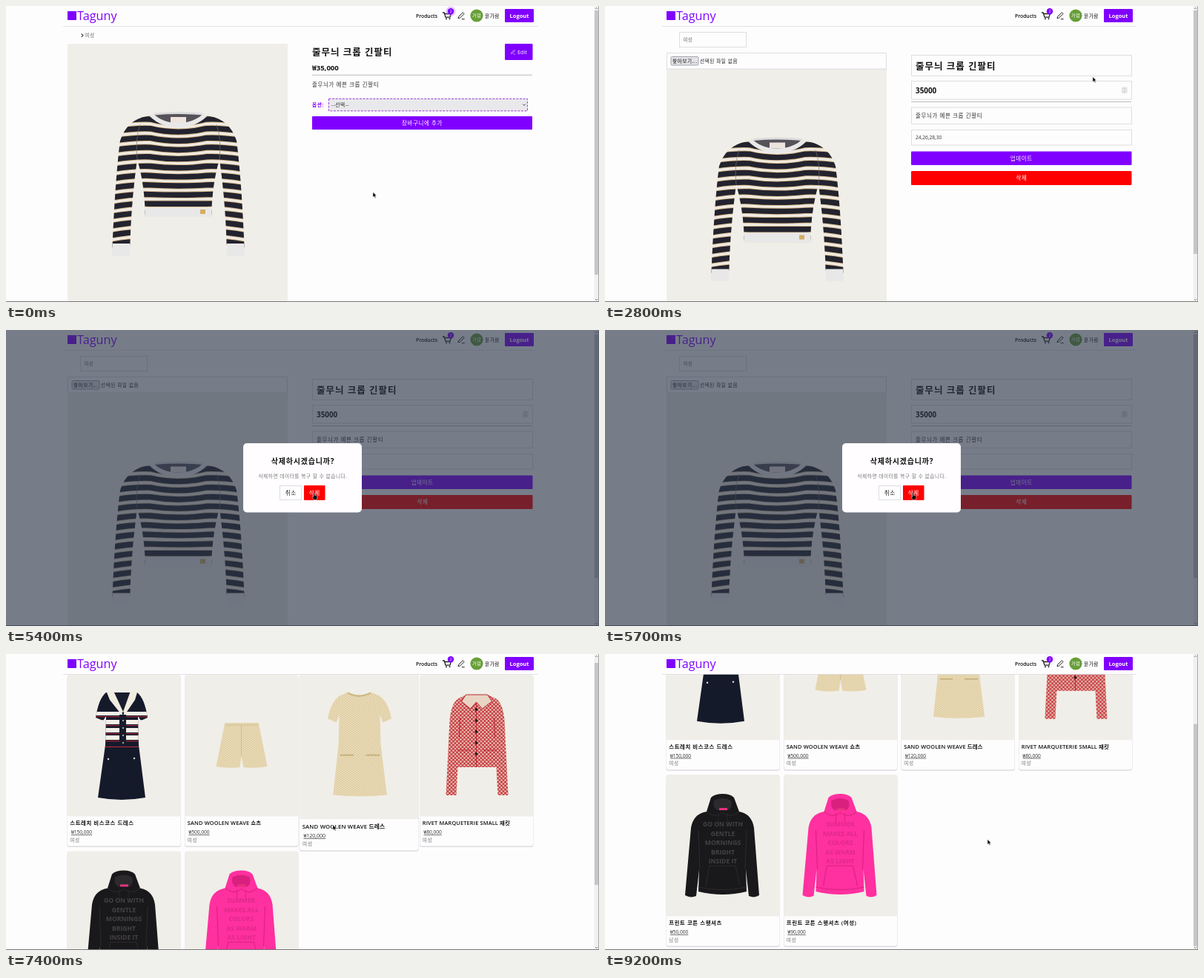
Animation, 800 px wide and 400 px high, one loop 9.3 s. Source, as an HTML page:

```html
<!DOCTYPE html>
<html lang="ko">
<head>
<meta charset="utf-8">
<title>Shop demo</title>
<style>
html, body { margin: 0; width: 100%; height: 100%; overflow: hidden; background: #fefdfe; }
svg { display: block; width: 800px; height: 400px; }
text { font-family: "Open Sans", "Noto Sans CJK KR", "Noto Sans CJK", sans-serif; white-space: pre; }
</style>
</head>
<body>
<svg id="stage" viewBox="0 0 800 400" xmlns="http://www.w3.org/2000/svg"></svg>
<script>
const PURPLE = '#8000ff', RED = '#ff0000', INK = '#111', BEIGE = '#f0eee8', LINE = '#dedde0';
const LOOP = 9300;

// Drawing helpers
const rect = (x, y, w, h, fill, more = '') =>
  `<rect x="${x}" y="${y}" width="${w}" height="${h}" fill="${fill}" ${more}/>`;
const path = (d, fill, more = '') => `<path d="${d}" fill="${fill}" ${more}/>`;
const stroke = (d, color, width = 1, more = '') =>
  path(d, 'none', `stroke="${color}" stroke-width="${width}" ${more}`);
const circle = (x, y, r, fill, more = '') => `<circle cx="${x}" cy="${y}" r="${r}" fill="${fill}" ${more}/>`;
const group = (id, body, more = '') => `<g id="${id}" ${more}>${body}</g>`;

function text(x, y, str, size, { fill = INK, weight = 400, anchor = 'start', more = '' } = {}) {
  const hangul = /[가-힣]/.test(str), latin = /[A-Z]/.test(str);
  const spacing = hangul ? (latin ? 0.02 : 0.08) : 0;
  return `<text x="${x}" y="${y}" font-size="${size}" fill="${fill}" font-weight="${weight}" ` +
    `text-anchor="${anchor}" letter-spacing="${(spacing * size).toFixed(2)}" ${more}>${str}</text>`;
}
const field = (x, y, w, h) => rect(x + .5, y + .5, w - 1, h - 1, '#fefdfe', `stroke="${LINE}"`);
const button = (x, y, w, h, fill, label, size = 7.5, weight = 400) =>
  rect(x, y, w, h, fill, 'rx="1"') +
  text(x + w / 2, y + h / 2 + size * .37, label, size, { fill: '#fff', weight, anchor: 'middle' });
const pencil = (x, y, s, color) =>
  `<g transform="translate(${x} ${y}) scale(${s})">` +
  stroke('M1 9L1.8 6.4L7.6 .8L9.4 2.6L3.7 8.2ZM6 10H10', color, 1) + '</g>';

// Garments
function sweater() {
  const body = 'M190 149Q163 154 154 182Q147 235 143 338H167Q168 270 177 207Q187 240 188 285H277' +
    'Q278 240 288 207Q297 270 298 338H322Q318 235 311 182Q302 154 275 149Q265 144 262 144H203Q200 144 190 149Z';
  let stripes = '';
  for (let i = 0; i < 14; i++) {
    const y = 153 + i * 12.7, sag = Math.max(0, 10 - i * 1.1);
    const d = `M138 ${y + 5}Q170 ${y - 1} 195 ${y}Q232 ${y + sag} 270 ${y}Q295 ${y - 1} 327 ${y + 5}`;
    stripes += stroke(d, '#d9bd8d', 9.4) + stroke(d, '#23232f', 7.4);
  }
  return `<clipPath id="knit"><path d="${body}"/></clipPath><g clip-path="url(#knit)">` +
    rect(140, 140, 190, 200, '#efebe5') + stripes +
    rect(186, 272, 93, 14, '#e9e8e8') + rect(140, 321, 30, 20, '#e9e8e8') + rect(296, 321, 30, 20, '#e9e8e8') +
    stroke('M177 207Q174 180 181 160M288 207Q291 180 284 160', '#77727a', .6) + '</g>' +
    path('M200 147Q232 142 265 147Q252 160 232 160Q212 160 200 147Z', '#55525a') +
    rect(222, 150, 21, 8, '#eee3dd') +
    stroke('M196 147Q210 161 232 161Q255 161 269 147', '#e9e8e8', 6) +
    stroke('M200 146Q232 143 265 146', '#dddcdc', 3) +
    rect(262, 275, 7, 6, '#d3ae62');
}

function stripedDress() {
  const shape = 'M52 24Q42 32 38 58L48 62L52 56L51 95L41 166Q73 172 105 166L96 95L95 56L99 62L108 58Q104 32 94 24Z';
  const bands = [[50, 5], [61, 6], [72, 6], [82, 6]].map(([y, h]) =>
    rect(35, y, 76, h, '#f3efe8') + rect(35, y + h + 1.2, 76, 1, '#c22b38')).join('');
  const dots = [62, 72, 82, 92].map(y => circle(75, y, 1.1, '#d8c999')).join('');
  return `<clipPath id="navy"><path d="${shape}"/></clipPath>` + path(shape, '#151a2b') +
    `<g clip-path="url(#navy)">${bands}${rect(35, 97, 76, 1, '#c22b38')}</g>` +
    path('M63 24H84L75 56Z', '#181c2c') + rect(70, 54, 9, 41, '#181c2c') + dots +
    path('M53 24L62 22L75 50L72 53L57 34Z', '#f1ece0') + path('M94 24L85 22L75 50L78 53L91 34Z', '#f1ece0') +
    circle(55, 114, 1.2, '#e5e0d2') + circle(90, 113, 1.2, '#e5e0d2');
}

const tweedShape = (d, extra = '') => path(d, '#e3d2aa') + path(d, 'url(#tweed)') + extra;
const shorts = () => tweedShape('M54 65H99L103 84L111 124Q94 127 79 125L76 110L74 125Q58 127 42 124L50 84Z',
  stroke('M54 68H99M76 68V110', '#cdb987', .8));
const tweedDress = () => tweedShape(
  'M62 28Q76 35 91 28L101 32Q113 38 118 62L107 67L103 57L104 95L112 160Q77 164 43 160L50 95L51 57L47 67L36 62Q41 38 53 32Z',
  stroke('M62 29Q76 37 91 29', '#cdb987', 2) + stroke('M52 109H69M85 109H103', '#c3ac76', 1.6));

function jacket() {
  const d = 'M52 32Q42 38 40 62L35 163H49L53 85L50 125H104L101 85L105 163H119L114 62Q112 38 102 32L91 27H62Z';
  const studs = [47, 62, 77, 92, 107].map(y => circle(76, y, 2, '#2b2020')).join('');
  return path(d, '#ead7c2') + path(d, 'url(#weave)') +
    path('M62 27H91L97 36L84 46L76 37L68 46L56 36Z', '#e8d5c3', 'stroke="#bd2833" stroke-width="1"') +
    stroke('M76 38V125M50 102H68M85 102H104M53 85L54 58M101 85L100 58', '#bd2833', 1.1) + studs;
}

function hoodie(main, shade, ink, lines) {
  const print = lines.map((s, i) =>
    text(76, 70 + i * 12.5, s, 8.6, { fill: ink, weight: 700, anchor: 'middle' })).join('');
  return path('M54 50Q36 53 33 72L25 163Q32 167 40 164L44 128L43 158Q76 166 108 158L107 128L111 164' +
      'Q119 167 125 163L118 72Q115 53 98 50L91 31Q86 26 76 26Q65 26 60 31Z', main) +
    path('M64 35Q76 29 87 35Q90 44 84 48H68Q62 44 64 35Z', shade) + rect(71, 45, 11, 3, '#e8327f') +
    stroke('M54 50Q66 60 76 51Q86 60 98 50M45 128L43 75M106 128L108 75M53 150L58 123H93L99 150M43 152Q76 159 108 152', shade, 1) +
    stroke('M70 52V68M82 52V66', shade, .8) + print;
}

// Pages
const header = () =>
  rect(0, 0, 794, 27, '#fefdfe') + rect(77, 27, 640, .8, LINE) +
  rect(83, 7, 12, 12, PURPLE) + text(96, 19, 'Taguny', 16.2, { fill: PURPLE }) +
  text(553, 16, 'Products', 6.8, { weight: 600 }) +
  stroke('M589 9H591.2L593 15.2H599L600.4 10.5H592', '#222', 1.3) +
  circle(594, 17.3, 1, '#222') + circle(598.5, 17.3, 1, '#222') +
  circle(600, 7.3, 4.2, '#b05cff', 'id="ping"') + circle(600, 7.3, 4.2, PURPLE) +
  text(600, 9, '2', 4.8, { fill: '#fff', anchor: 'middle' }) +
  pencil(609, 8, .97, '#222') +
  circle(635, 13, 8.6, '#689f38') + text(635.2, 15.3, '가람', 6.2, { fill: '#fff', anchor: 'middle' }) +
  text(646, 15.8, '윤가람', 6.67, { weight: 500 }) +
  button(673, 4, 39, 18, PURPLE, 'Logout', 7.5, 700);

const detailPage = () =>
  stroke('M101.7 37.5L104 39.8L101.7 42', '#444', 1.1) + text(106.3, 42.3, '여성', 6.67, { fill: '#666' }) +
  rect(83, 51, 297, 349, BEIGE) + '<use href="#sweater"/>' +
  text(413, 67, '줄무늬 크롭 긴팔티', 12.5, { weight: 700 }) +
  text(413, 87, '₩35,000', 9.6, { weight: 700 }) + rect(413, 92.8, 297, .9, '#b5b5b8') +
  text(413, 108.5, '줄무늬가 예쁜 크롭 긴팔티', 7.5, { fill: '#333' }) +
  text(413, 136, '옵션:', 6.67, { fill: PURPLE, weight: 700 }) +
  rect(435.4, 125.4, 268, 16.4, '#e9e9ec', 'stroke="#8b2bd0" stroke-width=".9" stroke-dasharray="3 1.6"') +
  text(439, 136, '--선택--', 6.67, { fill: '#222' }) +
  stroke('M697.3 132.6L699 134.4L700.7 132.6', '#333', .9) +
  button(413, 149, 297, 18, PURPLE, '장바구니에 추가') +
  rect(673, 53, 37.5, 21.5, '#b9a7cc', 'rx="2" id="editShadow" opacity=".6"') +
  rect(673, 51, 37.5, 22, PURPLE, 'rx="1" id="editButton"') +
  pencil(681, 59, .6, '#fff') + text(690, 65, 'Edit', 7.2, { fill: '#fff' });

const editPage = () =>
  field(100, 35, 91, 21) + text(105.5, 48, '여성', 6.3, { fill: '#666' }) +
  rect(83, 85, 297, 315, BEIGE) + '<use href="#sweater" y="34.5"/>' + field(83, 63, 297, 22.5) +
  rect(89, 68.5, 37, 11.5, '#e4e4e8', 'rx="1.5" stroke="#8f8f9d" stroke-width=".8"') +
  text(107.7, 77, '찾아보기...', 6.67, { anchor: 'middle' }) +
  text(128, 77, '선택된 파일 없음', 6.67, { fill: '#222' }) +
  field(413, 66, 298, 29) + text(419, 85.5, '줄무늬 크롭 긴팔티', 12.5, { weight: 700 }) +
  field(413, 101, 298, 25.5) + text(419, 118, '35000', 9.9, { weight: 700 }) +
  rect(697.5, 110, 6.5, 7.5, '#f1f1f3', 'rx="1" stroke="#c8c8cc" stroke-width=".6"') +
  stroke('M699.4 112.9L700.8 111.5L702.2 112.9M699.4 114.7L700.8 116.1L702.2 114.7', '#777', .6) +
  rect(413, 129, 297, .9, '#b5b5b8') +
  field(413, 136.5, 298, 23.5) + text(419, 151.2, '줄무늬가 예쁜 크롭 긴팔티', 7.5, { fill: '#333' }) +
  field(413, 167, 298, 21.5) + text(419, 180.2, '24,26,28,30', 6.67, { fill: '#333' }) +
  button(413, 196.5, 297.5, 18.5, PURPLE, '업데이트') +
  rect(413, 223, 297.5, 19, RED, 'rx="1"') +
  text(562, 235.4, '', 7.5, { fill: '#fff', anchor: 'middle', more: 'id="deleteLabel"' }).replace(/letter-spacing="0.00"/, 'letter-spacing=".6"');

const products = [
  ['스트레치 비스코스 드레스', '150,000', '여성', stripedDress()],
  ['SAND WOOLEN WEAVE 쇼츠', '500,000', '여성', shorts()],
  ['SAND WOOLEN WEAVE 드레스', '120,000', '여성', tweedDress()],
  ['RIVET MARQUETERIE SMALL 재킷', '80,000', '여성', jacket()],
  ['프린트 코튼 스웻셔츠', '50,000', '남성',
    hoodie('#19181a', '#2c2a2d', '#444246', ['GO ON WITH', 'GENTLE', 'MORNINGS', 'BRIGHT', 'INSIDE IT'])],
  ['프린트 코튼 스웻셔츠 (여성)', '90,000', '여성',
    hoodie('#ff309f', '#d9207f', '#e0288c', ['SUMMER', 'MAKES ALL', 'COLORS', 'AS WARM', 'AS LIGHT'])]
];
const card = ([title, price, kind, art], i) => {
  const x = 83 + (i % 4) * 158.5, y = 28 + Math.floor(i / 4) * 238.4;
  return `<g transform="translate(${x} ${y})"><g id="card${i}">` +
    rect(-.5, 1, 153.5, 232, '#dddbe0', 'rx="3.5"') + rect(0, 0, 152.5, 231.5, '#fefdfe', 'rx="3"') +
    rect(0, 0, 152.5, 191.5, BEIGE, 'rx="2"') + art +
    text(3.3, 203.3, title, 7.4, { weight: 600 }) +
    text(5, 215, '₩' + price, 6.67, { fill: '#333', more: 'text-decoration="underline"' }) +
    text(3.3, 225.6, kind, 6.67, { fill: '#777' }) + '</g></g>';
};
const listPage = () => [0, 1, 3, 4, 5, 2].map(i => card(products[i], i)).join('');

const dialog = () =>
  rect(0, 0, 800, 400, 'rgb(40,52,70)', 'opacity=".63"') +
  rect(320, 153, 160, 93.5, '#fffdff', 'rx="5"') +
  text(400.5, 181, '삭제하시겠습니까?', 10, { weight: 700, anchor: 'middle' }) +
  text(400.5, 199.7, '삭제하면 데이터를 복구 할 수 없습니다.', 6.67, { fill: '#777', anchor: 'middle' }) +
  field(369, 210, 30, 20) + text(384.3, 222.9, '취소', 7.5, { fill: '#222', anchor: 'middle' }) +
  button(402, 210, 28.5, 20, RED, '삭제');

const toast = () =>
  rect(0, 0, 800, 22, '#00ff00') +
  rect(341, 7.7, 6.8, 6.8, '#e9f5e6', 'rx=".8" stroke="#245a24" stroke-width=".8"') +
  stroke('M342.4 11L344 12.8L346.7 9', '#222', 1) +
  text(351.5, 13.6, '성공적으로 제품이 삭제 되었습니다.', 6.67, { fill: '#27402a' });

const scrollbar = () =>
  rect(793.5, 0, 6.5, 400, '#f0f0f1') + rect(794, 6, 5, 300, '#c6c6c8', 'id="thumb"') +
  stroke('M795 4L796.6 2.4L798.2 4M795 396L796.6 397.6L798.2 396', '#666', .8) +
  rect(799.2, 0, .8, 400, '#98989a') + rect(0, 399, 800, 1, '#77777a');

const cursors = () =>
  group('arrow', path('M0 0V7L1.7 5.5L2.9 8L4 7.5L2.9 5.1H5Z', '#000', 'stroke="#fff" stroke-width=".5"')) +
  group('hand', path('M-.9 1Q0 -.4 .9 1V4Q1.8 3.5 2.4 4.2Q3.2 3.8 3.6 4.7Q4.5 4.5 4.6 5.5L4 9.8H-.6L-2.5 6.4Q-2.4 5.3 -.9 6Z',
    '#111', 'stroke="#fff" stroke-width=".5"'));

const stage = document.getElementById('stage');
stage.innerHTML =
  `<defs><pattern id="tweed" width="4" height="3" patternUnits="userSpaceOnUse">
    <path d="M0 .7H2M2 2.2H4" stroke="#f3e8cc" stroke-width=".8"/><path d="M2.4 .7H3.6M.4 2.2H1.6" stroke="#cdb682" stroke-width=".6"/></pattern>
  <pattern id="weave" width="5" height="5" patternUnits="userSpaceOnUse">
    <path d="M0 0L5 5M5 0L0 5" stroke="#c3202e" stroke-width="1.2"/></pattern>
  <g id="sweater">${sweater()}</g></defs>` +
  rect(0, 0, 800, 400, '#fefdfe') +
  group('detail', detailPage()) + group('edit', editPage()) + group('list', listPage()) +
  header() + scrollbar() + group('dialog', dialog()) + group('toast', toast()) + group('cursor', cursors());

// Timeline
const holds = [[400, 700], [1400, 1700], [2400, 2700], [3400, 3700], [4400, 4600], [5400, 5700], [6400, 6700]];
const route = [
  [0, 495, 251.5], [700, 495, 251.5], [1400, 668, 84], [1800, 684, 58], [2400, 684, 58], [3400, 610, 165],
  [4100, 553, 233.5], [4500, 553, 233.5], [5200, 415.5, 219.5], [7100, 415.5, 219.5],
  [7400, 441, 231], [7700, 441, 231], [8300, 516, 250.5], [LOOP, 516, 250.5]
];
const scrollKeys = [[0, 0], [7400, 0], [7600, 103.3], [LOOP, 103.3]];

function snap(t) {
  const step = Math.floor(t / 100) * 100;
  const hold = holds.find(([a, b]) => step >= a && step < b);
  return hold ? hold[0] : step;
}
function at(keys, t, column) {
  const i = Math.max(1, keys.findIndex(k => k[0] >= t));
  const a = keys[i - 1], b = keys[i], p = (t - a[0]) / (b[0] - a[0]);
  return a[column] + (b[column] - a[column]) * p * p * (3 - 2 * p);
}
const el = id => document.getElementById(id);
const set = (id, attrs) => { for (const k in attrs) el(id).setAttribute(k, attrs[k]); };
const show = (id, on) => set(id, { display: on ? 'inline' : 'none' });

function draw(time) {
  const t = snap(time);
  const page = t < 2200 ? 'detail' : t < 7200 ? 'edit' : 'list';
  const asking = t >= 4300 && t < 5900;
  ['detail', 'edit', 'list'].forEach(id => show(id, id === page));
  show('dialog', asking);
  show('toast', t >= 6700 && t < 7200);

  const x = at(route, t, 1), y = at(route, t, 2), scroll = at(scrollKeys, t, 1);
  const overEdit = page === 'detail' && x > 673 && y > 51 && y < 73;
  const overDelete = page === 'edit' && (t >= 5000 || (!asking && t >= 3900) || t < 2400);
  set('cursor', { transform: `translate(${x} ${y})` });
  show('hand', overEdit || overDelete);
  show('arrow', !(overEdit || overDelete));
  set('editButton', { fill: overEdit ? '#9630ff' : PURPLE });
  show('editShadow', overEdit);
  el('deleteLabel').textContent = t >= 5900 ? '삭제 중...' : '삭제';

  set('list', { transform: `translate(0 ${-scroll})` });
  const overCard = t >= 7300 && t < 7600;
  set('card2', { transform: overCard ? 'translate(76.25 115.7) scale(1.05) translate(-76.25 -115.7)' : '' });
  const [top, height] = { detail: [6, 357], edit: [6, 329], list: [12 + scroll * .8, 300] }[page];
  set('thumb', { y: top, height });

  const beat = Math.min(1, ((t + 150) % 1000) / 750), grow = 1 - (1 - beat) ** 4;
  set('ping', { r: 4.2 * (1 + grow), opacity: (1 - grow) * .75 });
}

const start = performance.now();
function tick() {
  draw((performance.now() - start) % LOOP);
  requestAnimationFrame(tick);
}
tick();
</script>
</body>
</html>
```
